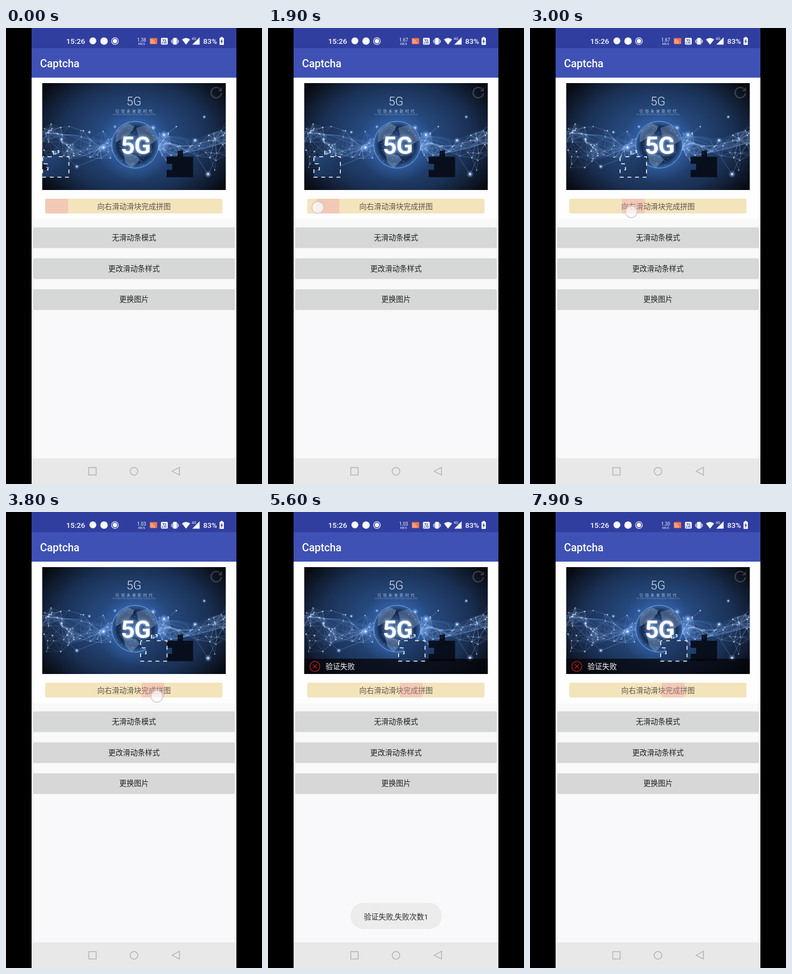
Animation, 470 px wide and 836 px high, one loop 8000 ms. Source, as an HTML page with a canvas:

```html
<!DOCTYPE html>
<html lang="zh-CN">
<head>
<meta charset="utf-8">
<title>Captcha</title>
<style>
  html, body { margin: 0; width: 100%; height: 100%; overflow: hidden; background: #000; }
  canvas { display: block; }
</style>
</head>
<body>
<canvas id="stage" width="470" height="836"></canvas>
<script>
const LOOP = 8000, STEP = 100;
const TOUCH = 1900, RELEASE = 5000;
const PHOTO = { x: 66.5, y: 101, w: 337, h: 196 };
const TRACK = { x: 72, w: 325.5, thumb: 42 };
const HOLE_X = 295, START_X = 67, PIECE_W = 48.5;
const SANS = 'Roboto, "Noto Sans CJK SC", "Noto Sans CJK", sans-serif';
const TOUCH_X = [[TOUCH, 91.5], [3000, 186], [3800, 277], [4500, 267]];
const TOUCH_Y = [[TOUCH, 329], [3000, 337], [3800, 338], [4500, 337]];
const screen = document.getElementById('stage').getContext('2d');
let g = screen;

function rect(x, y, w, h, fill, r = 0) {
  g.fillStyle = fill;
  g.beginPath();
  g.roundRect(x, y, w, h, r);
  g.fill();
}

function circle(x, y, r, fill, stroke, width = 1) {
  g.beginPath();
  g.arc(x, y, r, 0, 7);
  if (fill) { g.fillStyle = fill; g.fill(); }
  if (stroke) { g.strokeStyle = stroke; g.lineWidth = width; g.stroke(); }
}

function poly(points, fill, stroke, width = 1, closed = true) {
  g.beginPath();
  points.forEach(([x, y]) => g.lineTo(x, y));
  if (closed) g.closePath();
  if (fill) { g.fillStyle = fill; g.fill(); }
  if (stroke) { g.strokeStyle = stroke; g.lineWidth = width; g.stroke(); }
}

function arc(x, y, r, from, to, stroke, width) {
  g.beginPath();
  g.arc(x, y, r, from, to);
  g.strokeStyle = stroke;
  g.lineWidth = width;
  g.stroke();
}

function text(value, x, y, size, fill, { align = 'left', weight = 400, spacing = 0 } = {}) {
  g.font = `${weight} ${size}px ${SANS}`;
  g.letterSpacing = spacing + 'px';
  g.textAlign = align;
  g.fillStyle = fill;
  g.fillText(value, x, y);
}

function glow(x, y, r, color) {
  const fade = g.createRadialGradient(x, y, 0, x, y, r);
  fade.addColorStop(0, color);
  fade.addColorStop(1, 'rgba(60,120,220,0)');
  g.fillStyle = fade;
  g.fillRect(x - r, y - r, 2 * r, 2 * r);
}

function randomizer(seed) {
  return () => (seed = (seed * 16807) % 2147483647) / 2147483647;
}

function drawNetwork() {
  const random = randomizer(41);
  // Fine strands waving from side to side, pinched at the globe
  for (let i = 0; i < 22; i++) {
    const phase = i * 0.15, points = [];
    for (let x = 66; x <= 404; x += 4) {
      const spread = 6 + 26 * Math.abs(x - 237) / 170;
      points.push([x, 211 + Math.sin(x / 27 + phase) * spread * (0.3 + i / 32) + (i - 11) * 0.7]);
    }
    poly(points, null, `rgba(115,165,240,${0.14 + (i % 4) * 0.09})`, 0.7, false);
  }
  // Mesh of linked points, wider toward both edges
  const nodes = [];
  for (let i = 0; i < 120; i++) {
    const side = i % 2 ? 1 : -1, d = 40 + random() * 132;
    nodes.push([237 + side * d, 215 + (random() + random() - 1) * (16 + d * 0.27)]);
  }
  nodes.forEach(([ax, ay], i) => {
    nodes.slice(i + 1).forEach(([bx, by]) => {
      const d = Math.hypot(ax - bx, ay - by);
      if (d < 29) poly([[ax, ay], [bx, by]], null, `rgba(155,190,240,${0.5 - d / 90})`, 0.7, false);
    });
    circle(ax, ay, 0.6 + random() * 0.8, 'rgba(205,225,255,.85)');
  });
  poly([[75, 203], [130, 254], [193, 229]], null, 'rgba(150,185,235,.5)', 0.7, false);
  poly([[330, 206], [371, 268], [400, 207]], null, 'rgba(150,185,235,.5)', 0.7, false);
  for (const [x, y, r] of [[179, 219, 9], [200, 181, 4], [130, 254, 5], [371, 268, 7], [290, 196, 9],
    [347, 206, 6], [364, 163, 4], [102, 204, 5], [153, 191, 4], [270, 183, 7]]) {
    glow(x, y, r, 'rgba(215,232,255,.95)');
    circle(x, y, r / 5, '#fff');
  }
}

function drawGlobe() {
  const x = 237, y = 214, r = 43;
  glow(x, y, 70, 'rgba(90,150,235,.7)');
  const shade = g.createRadialGradient(x, y, 5, x, y, r);
  shade.addColorStop(0, '#34578c');
  shade.addColorStop(0.7, '#11264c');
  shade.addColorStop(1, '#3766a6');
  circle(x, y, r, shade, 'rgba(150,195,245,.7)', 1);
  g.save();
  g.beginPath();
  g.arc(x, y, r, 0, 7);
  g.clip();
  poly([[203, 188], [222, 174], [236, 180], [227, 195], [213, 203], [201, 210]], 'rgba(125,150,185,.5)');
  poly([[239, 183], [261, 177], [279, 204], [262, 216], [243, 199]], 'rgba(125,150,185,.45)');
  poly([[215, 229], [239, 233], [246, 242], [230, 257], [219, 246]], 'rgba(125,160,200,.5)');
  const random = randomizer(9);
  for (let i = 0; i < 75; i++) {
    circle(x + (random() - 0.5) * 82, y + (random() - 0.5) * 82, 0.7, 'rgba(205,220,245,.55)');
  }
  g.restore();
  g.shadowColor = '#a9cfff';
  g.shadowBlur = 6;
  text('5G', 238, 231, 45, '#fbfdff', { align: 'center', weight: 700, spacing: -1 });
  g.shadowBlur = 0;
}

function drawPhoto() {
  const { x, y, w, h } = PHOTO;
  g.save();
  g.beginPath();
  g.rect(x, y, w, h);
  g.clip();
  g.translate(235, 201);
  g.scale(1, 0.72);
  const back = g.createRadialGradient(0, 0, 15, 0, 0, 205);
  back.addColorStop(0, '#2c5593');
  back.addColorStop(0.35, '#234475');
  back.addColorStop(0.65, '#1a3054');
  back.addColorStop(0.87, '#0f192b');
  back.addColorStop(1, '#080b12');
  g.fillStyle = back;
  g.fillRect(-170, -145, 340, 290);
  g.scale(1, 1 / 0.72);
  g.translate(-235, -201);
  drawNetwork();
  drawGlobe();
  text('5G', 235, 142, 22, '#dfe4ee', { align: 'center', weight: 300 });
  text('引领未来新时代', 236.5, 154.5, 7, '#b3bfd2', { align: 'center', spacing: 3.2 });
  text('THE BRIGHT NEW ERA OF INTELLIGENT CONNECTIONS', 235, 160, 3.2, 'rgba(170,185,210,.6)', { align: 'center' });
  g.restore();
}

function drawStatusBar() {
  const white = '#fafaff', blue = '#303f9f';
  rect(47, 0, 376, 37, blue);
  text('15:26', 110.5, 28.5, 13.7, white, { weight: 500 });
  circle(159.5, 23.5, 6.3, white);
  circle(180, 24, 6.8, white);
  circle(200, 24, 6.2, null, white, 1.2);
  circle(200, 24, 4, white);
  text('KB/S', 249, 30.5, 5.6, white, { align: 'center' });
  rect(264, 18.5, 13.5, 11, '#f0764f', 1);
  [2, 4.5, 7].forEach(r => arc(265.5, 28.5, r, -Math.PI / 2, 0, '#fff0e8', 1));
  rect(284.5, 18, 12.5, 12.5, white, 2);
  text('Vo', 290.7, 24, 6, blue, { align: 'center', weight: 700 });
  text('LTE', 290.7, 29.4, 5.5, blue, { align: 'center', weight: 700 });
  rect(307, 18, 6.5, 12.5, white, 1);
  for (const side of [-1, 1]) {
    rect(309.7 + side * 4.4, 20, 1.1, 9, white);
    rect(309.7 + side * 6.3, 22, 1.1, 5, white);
  }
  g.beginPath();
  g.moveTo(330.5, 30.5);
  g.lineTo(323, 21);
  g.quadraticCurveTo(330.5, 15.5, 338, 21);
  g.fillStyle = white;
  g.fill();
  text('4G', 341, 22, 6.5, white);
  poly([[355.5, 17], [355.5, 30.5], [342, 30.5]], white);
  text('83%', 362, 28.5, 13.6, white, { weight: 500 });
  rect(394, 16.5, 4, 2, white);
  rect(392, 18, 8, 13, white, 1);
  poly([[397, 19.5], [393.7, 25], [395.7, 25], [395, 29.5], [398.4, 23.7], [396.4, 23.7]], blue);
}

function drawNavBar() {
  const gray = '#b0b0b0';
  rect(47, 789, 376, 47, '#e8e8e8');
  g.strokeStyle = gray;
  g.lineWidth = 1.4;
  g.strokeRect(152, 806, 13.5, 13.5);
  circle(235, 812.8, 7, null, gray, 1.4);
  poly([[305, 812.5], [318.5, 805.5], [318.5, 819.5]], null, gray, 1.4);
}

function drawPage() {
  rect(0, 0, 470, 836, '#000');
  rect(47, 37, 376, 752, '#f9f9fb');
  rect(47, 91, 376, 260, '#fefefe');
  rect(47, 37, 376, 54, '#3f51b5');
  text('Captcha', 62.5, 71.5, 19.5, '#fff', { weight: 500 });
  drawStatusBar();
  ['无滑动条模式', '更改滑动条样式', '更换图片'].forEach((label, i) => {
    const y = 365.5 + i * 56.7;
    rect(50, y, 370, 38, '#d6d7d7', 2);
    text(label, 235, y + 23.5, 13.5, '#212121', { align: 'center' });
  });
  drawNavBar();
}

// Jigsaw outline: tab on top, notch on the left
function pieceShape(x) {
  return [[0, 236], [20, 236], [20, 225], [30, 225], [30, 236], [PIECE_W, 236], [PIECE_W, 273.5],
    [0, 273.5], [0, 260], [10, 260], [10, 249], [0, 249]].map(([dx, y]) => [x + dx, y]);
}

function drawPiece(x) {
  g.save();
  poly(pieceShape(x));
  g.clip();
  g.drawImage(photo, x - HOLE_X, 0);
  g.restore();
  g.setLineDash([7, 7]);
  g.lineDashOffset = 4;
  poly(pieceShape(x), null, '#fff', 1.6);
  g.setLineDash([]);
}

function drawReload() {
  const gray = 'rgba(95,95,100,.55)';
  arc(386, 118.5, 9.5, 0.1, 5.4, gray, 2.5);
  poly([[396.5, 108], [396.5, 116], [389, 116]], gray);
}

function drawFailBar(shown) {
  const y = 297 - 28 * shown;
  g.save();
  g.beginPath();
  g.rect(PHOTO.x, PHOTO.y, PHOTO.w, PHOTO.h);
  g.clip();
  rect(PHOTO.x, y, PHOTO.w, 28, 'rgba(4,5,8,.75)');
  circle(86, y + 14, 9.2, null, '#c3201c', 1.3);
  for (const s of [-1, 1]) poly([[82.5, y + 14 - 3.5 * s], [89.5, y + 14 + 3.5 * s]], null, '#c3201c', 1.3, false);
  text('验证失败', 105.5, y + 19, 13.5, '#fafafa');
  g.restore();
}

function drawToast(alpha) {
  g.globalAlpha = alpha;
  rect(151.5, 716.5, 167.5, 48, '#ececed', 24);
  text('验证失败,失败次数1', 235, 746.5, 13.5, '#2a2a2a', { align: 'center' });
  g.globalAlpha = 1;
}

const ramp = (t, from, to) => Math.min(1, Math.max(0, (t - from) / (to - from)));

// Smooth path through [time, value] keys, at rest at both ends
function follow(t, keys) {
  const last = keys.length - 1;
  const slope = i => i === 0 || i === last ? 0
    : (keys[i + 1][1] - keys[i - 1][1]) / (keys[i + 1][0] - keys[i - 1][0]);
  const next = keys.findIndex(([time]) => time > t);
  if (next === 0) return keys[0][1];
  if (next < 0) return keys[last][1];
  const [t0, a] = keys[next - 1], [t1, b] = keys[next];
  const span = t1 - t0, u = (t - t0) / span, v = 1 - u;
  return a * (1 + 2 * u) * v * v + b * (3 - 2 * u) * u * u
    + span * u * v * (slope(next - 1) * v - slope(next) * u);
}

function drawFrame(t) {
  // The thumb trails the finger by about two screen refreshes
  const progress = t < TOUCH ? 0 : (follow(t - 30, TOUCH_X) - TRACK.x) / TRACK.w;
  const slide = progress * (TRACK.w - TRACK.thumb);
  const speed = t < 1300 ? '1.38' : t < 3500 ? '1.67' : t < 7800 ? '1.03' : '1.30';
  g.drawImage(page, 0, 0);
  text(speed, 249, 24.5, 8.3, '#fafaff', { align: 'center' });
  g.drawImage(photo, 0, 0);
  drawReload();
  poly(pieceShape(HOLE_X), 'rgba(6,11,20,.9)');
  if (t >= RELEASE) drawFailBar(ramp(t, RELEASE, RELEASE + 200));
  drawPiece(START_X + progress * (PHOTO.w - PIECE_W));

  rect(TRACK.x, 313, TRACK.w, 27, '#f4e4bc', 3);
  text('向右滑动滑块完成拼图', 235, 331.5, 13.5, '#5c5850', { align: 'center' });
  rect(TRACK.x + slide, 313, TRACK.thumb, 27, 'rgba(238,150,165,.35)', 3);
  if (t >= TOUCH && t < RELEASE) {
    circle(follow(t, TOUCH_X), follow(t, TOUCH_Y), 10.8, 'rgba(252,250,252,.75)', '#c9c3c9', 1.2);
  }
  drawToast(ramp(t, RELEASE, RELEASE + 300) * (1 - ramp(t, 7100, 7500)));
}

function layer(draw) {
  const canvas = document.createElement('canvas');
  canvas.width = 470;
  canvas.height = 836;
  g = canvas.getContext('2d');
  draw();
  g = screen;
  return canvas;
}

const page = layer(drawPage), photo = layer(drawPhoto);

function tick() {
  drawFrame(Math.floor((performance.now() % LOOP) / STEP) * STEP);
  requestAnimationFrame(tick);
}
tick();
</script>
</body>
</html>
```
